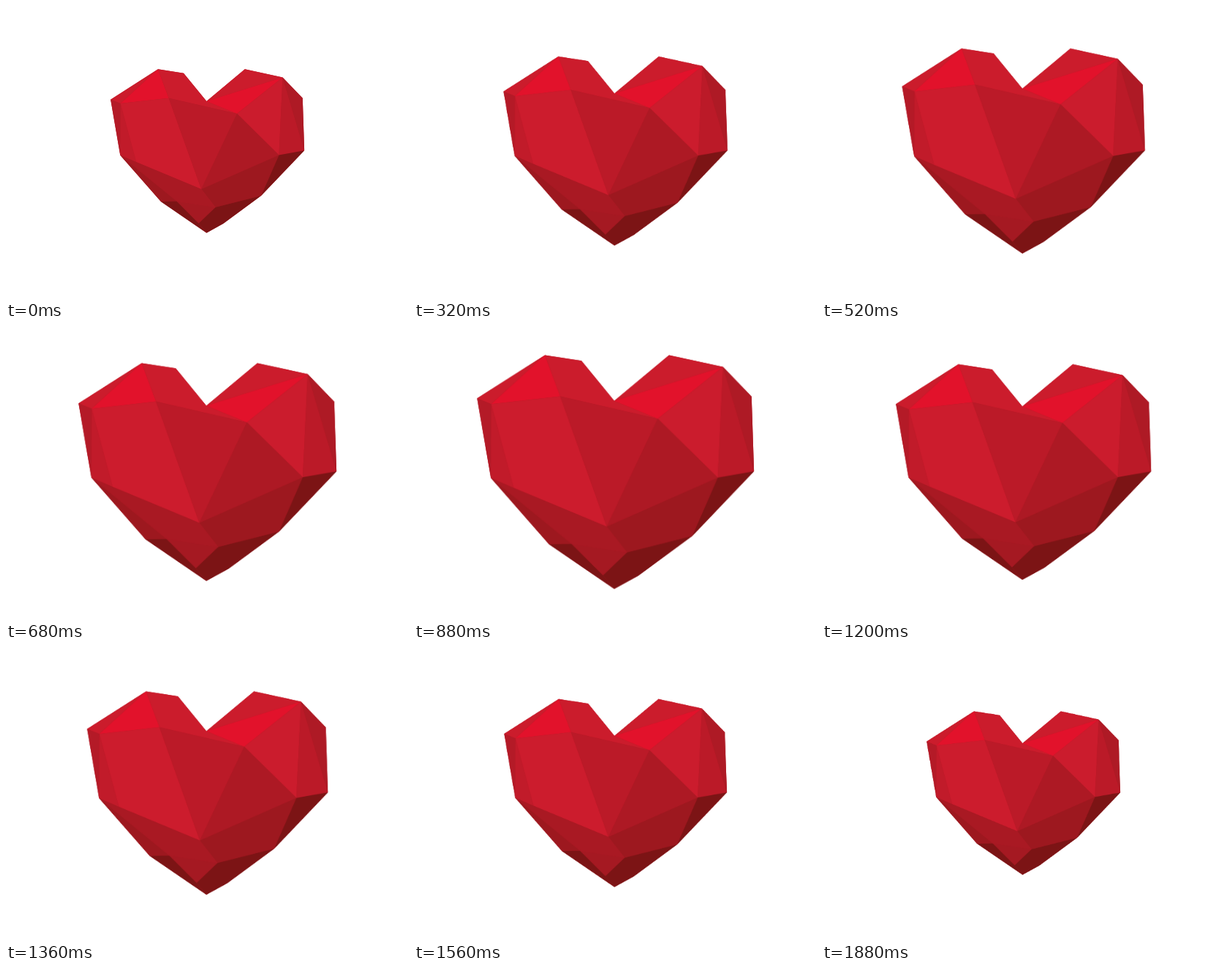
Write an HTML page that moves like this. It is 550 px wide and 400 px high and loops after 1.92 s.

```html
<!DOCTYPE html>
<html lang="en">
<head>
<meta charset="utf-8">
<title>Beating heart</title>
<style>
  html, body { margin: 0; width: 100%; height: 100%; overflow: hidden; background: #fff; }
  svg { display: block; width: 550px; height: 400px; }
  #heart {
    transform-origin: 275.3px 198px;
    animation: beat 1920ms infinite;
  }
  /* Swell for 920 ms, shrink for 960 ms, rest for 40 ms, in 40 ms ticks. */
  @keyframes beat {
    0% { transform: scale(.718); animation-timing-function: steps(23); }
    47.9167% { transform: scale(1.0403); animation-timing-function: steps(24); }
    97.9167%, 100% { transform: scale(.718); }
  }
</style>
</head>
<body>
<svg viewBox="0 0 550 400"><g id="heart"></g></svg>
<script>
const points = {
  A: [91.2, 100], B: [110, 107.5], C: [181.5, 42.5], D: [230.3, 50],
  E: [274, 103.3], F: [202, 97.3], G: [332, 127], H: [347, 42.5],
  I: [419, 58], J: [457, 97.5], K: [460.3, 197], L: [412, 205.5],
  M: [264, 270.5], N: [109.5, 206], O: [140, 219], P: [187, 294],
  Q: [217, 293.5], R: [291, 305], S: [259, 335.5], T: [274, 353.5],
  U: [306, 336], V: [378, 283]
};

// The first entry is the silhouette, which hides seams between facets.
const facets = [
  ["ACDEHIJKVUTPN", "#b41a27"],
  ["ACB", "#cb1c2c"],
  ["BCF", "#e2122b"],
  ["CDEGF", "#cb1c2c"],
  ["ABN", "#b41a27"],
  ["BON", "#c11b2a"],
  ["BFMO", "#cc1c2d"],
  ["EHI", "#cb1c2c"],
  ["EIG", "#e2122b"],
  ["IGL", "#cb1c2d"],
  ["IKL", "#bb1a28"],
  ["IJK", "#ae1a25"],
  ["FGM", "#bb1a28"],
  ["GLM", "#ad1924"],
  ["MLVR", "#9d181f"],
  ["LKV", "#7c1415"],
  ["NOMRQ", "#a91923"],
  ["NQP", "#9d181f"],
  ["QRS", "#a51922"],
  ["PQST", "#7c1415"],
  ["RVUTS", "#7c1415"]
];

const heart = document.getElementById("heart");
for (const [corners, fill] of facets) {
  const facet = document.createElementNS("http://www.w3.org/2000/svg", "polygon");
  facet.setAttribute("points", [...corners].map(key => points[key]).join(" "));
  facet.setAttribute("fill", fill);
  heart.append(facet);
}
</script>
</body>
</html>
```
